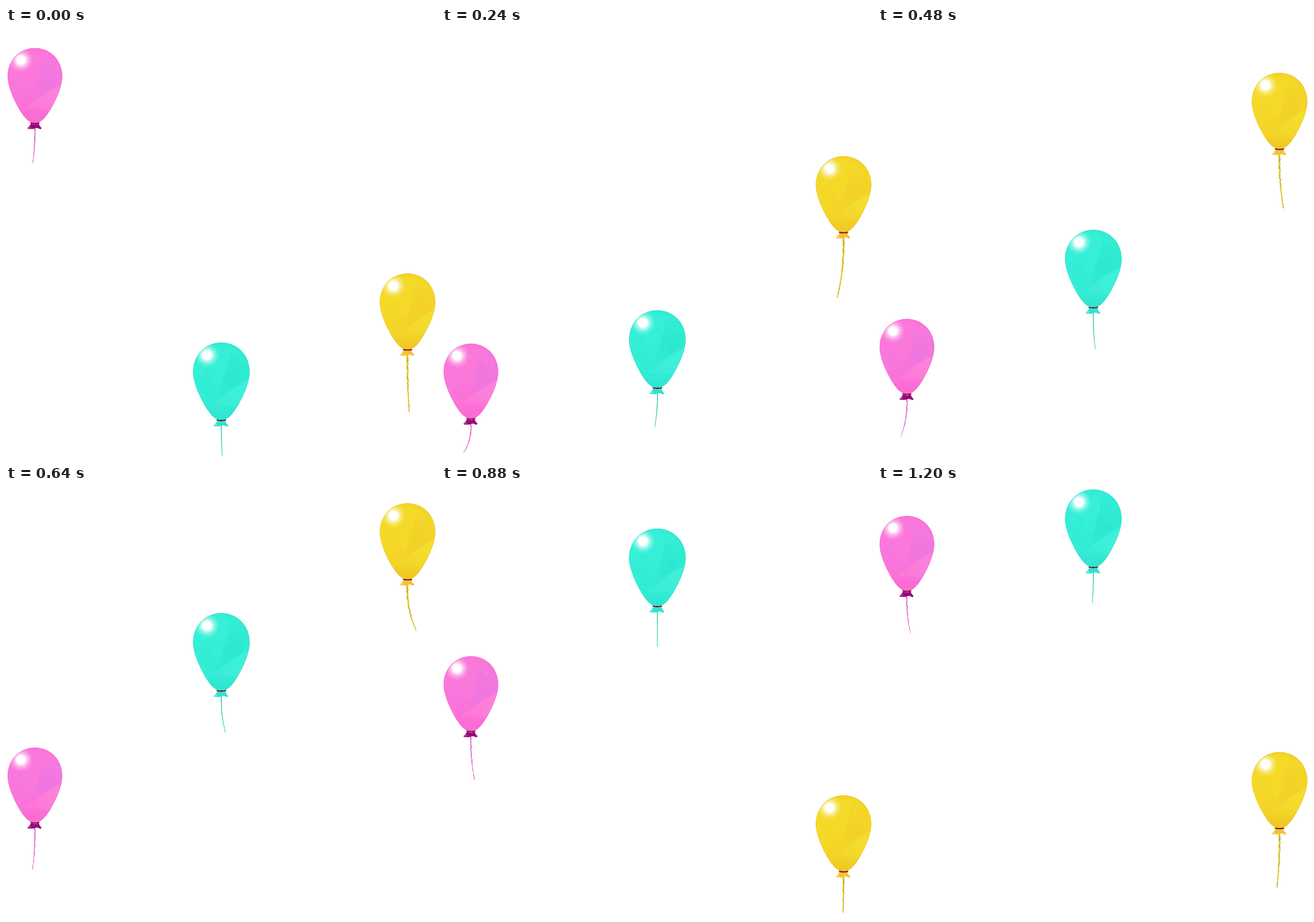
Write an HTML page with a canvas that moves like this. It is 748 px wide and 748 px high and loops after 1.28 s.

```html
<!DOCTYPE html>
<html lang="en">
<head>
<meta charset="utf-8">
<title>Balloons</title>
<style>
html, body { margin: 0; width: 100%; height: 100%; overflow: hidden; background: #fff; }
canvas { display: block; }
</style>
</head>
<body>
<canvas id="stage" width="748" height="748"></canvas>
<script>
const ctx = document.getElementById('stage').getContext('2d');
const LOOP = 1280, STEPS = 16, TAU = Math.PI * 2;

// rise: key points [steps since launch, top y]
const balloons = [
  {
    x: 50.3, scale: 0.965, seed: 11, launch: 3,
    rise: [[0, 549], [3, 506], [5, 455], [8, 296], [10, 112], [12, 52], [15, 7]],
    sway: { mid: -2, amp: 11, peak: 13, period: 18 },
    string: { length: 190, stretch: 25, width: 1.9, rough: 0.5, color: '#dc58c0', fleck: '#ee93d8' },
    base: '#fb78da', edge: '#f86ad2', facet: '#e074e4', light: '#ff86da', deep: '#ff60cf',
    knot: '#97087c', knotLight: '#c45aae', band: '#8c0c35'
  },
  {
    x: 374.6, scale: 1, seed: 23, launch: 0,
    rise: [[0, 547], [3, 491], [6, 351], [8, 221], [11, 74], [13, 25], [15, 6]],
    sway: { mid: 1.2, amp: 6, peak: 8, period: 10.5 },
    string: { length: 198, stretch: 10, width: 1.5, rough: 0.1, color: '#2cc6b0', fleck: '#2cc6b0' },
    base: '#35efd6', edge: '#2fe2cd', facet: '#22e0c8', light: '#46f1dc', deep: '#2fe4d2',
    knot: '#2de3d0', knotLight: '#8ff2e8', band: '#5e2024'
  },
  {
    x: 698.5, scale: 0.98, seed: 37, launch: 11,
    rise: [[0, 538], [2, 512], [5, 427], [8, 223], [11, 78], [13, 30], [15, 8]],
    sway: { mid: 2, amp: 13, peak: 8, period: 10.5 },
    string: { length: 204, stretch: 42, width: 3, rough: 0.9, color: '#e0c82e', fleck: '#c4ac2c' },
    base: '#f4da27', edge: '#eec128', facet: '#f0c628', light: '#f5df30', deep: '#f1c322',
    knot: '#f6c233', knotLight: '#fbdf84', band: '#7d1c1c'
  }
];

function random(seed) {
  return () => {
    seed = (seed * 16807) % 2147483647;
    return seed / 2147483647;
  };
}

// Monotone cubic through [x, y] points.
function curve(points, x) {
  const last = points.length - 1;
  let i = 0;
  while (i < last - 1 && x >= points[i + 1][0]) i++;
  const slope = k => (points[k + 1][1] - points[k][1]) / (points[k + 1][0] - points[k][0]);
  const tangent = k => {
    if (k === 0) return slope(0);
    if (k === last) return slope(last - 1);
    const a = slope(k - 1), b = slope(k);
    return a * b <= 0 ? 0 : 2 * a * b / (a + b);
  };
  const [x0, y0] = points[i], [x1, y1] = points[i + 1];
  const h = x1 - x0, u = (x - x0) / h, v = 1 - u;
  return y0 * v * v * (1 + 2 * u) + y1 * u * u * (3 - 2 * u)
    + h * u * v * (tangent(i) * v - tangent(i + 1) * u);
}

const skin = new Path2D(
  'M0 0C28 0 49.3 22 49.3 51C49.3 73 33 105 21.5 121C14 131 8 135 0 135' +
  'C-8 135-14 131-21.5 121C-33 105-49.3 73-49.3 51C-49.3 22-28 0 0 0Z');
const knot = new Path2D(
  'M-7 136Q0 139 7 136Q8 141 12 144Q11 147 9 146Q4 143 0 145Q-5 147-8 145.5Q-12 147-13.5 144.5Q-9 141-7 136Z');
const wedge = new Path2D('M16 14L38 16Q52 40 48 64Q20 76-2 100Q-8 105-16 106Q2 80 16 14Z');
const fold = new Path2D('M-25 44L-8 86L-18 108Q-40 84-46 60Z');
const sheen = new Path2D('M-18 110Q10 84 50 65Q46 88 24 112Q-2 106-18 110Z');

function fade(x, y, r, stops) {
  const g = ctx.createRadialGradient(x, y, 0, x, y, r);
  stops.forEach(([at, color]) => g.addColorStop(at, color));
  return g;
}

function fill(shape, style, alpha = 1) {
  ctx.globalAlpha = alpha;
  ctx.fillStyle = style;
  ctx.fill(shape);
  ctx.globalAlpha = 1;
}

function drawSpeckles(seed) {
  const rnd = random(seed);
  ctx.fillStyle = '#fff';
  for (let i = 0; i < 60; i++) {
    const x = -42 + 82 * rnd(), y = 15 + 55 * Math.pow(rnd(), 1.5);
    ctx.globalAlpha = 0.12 + 0.33 * rnd();
    ctx.beginPath();
    ctx.arc(x, y, 0.35 + 0.5 * rnd(), 0, TAU);
    ctx.fill();
  }
  ctx.globalAlpha = 1;
}

function drawBody(b) {
  ctx.save();
  ctx.scale(b.scale, b.scale);
  fill(knot, b.knot);
  ctx.fillStyle = b.knotLight;
  ctx.globalAlpha = 0.65;
  ctx.beginPath();
  ctx.ellipse(-9.5, 143.5, 3, 1.3, -0.6, 0, TAU);
  ctx.fill();
  ctx.globalAlpha = 1;

  ctx.save();
  ctx.clip(skin);
  fill(skin, fade(-2, 60, 82, [[0, b.base], [0.6, b.base], [1, b.edge]]));
  fill(wedge, fade(22, 64, 50, [[0, b.facet], [1, b.facet + '30']]), 0.5);
  fill(fold, b.facet, 0.15);
  fill(sheen, b.light, 0.65);
  fill(skin, fade(-6, 118, 50, [[0, b.deep + '60'], [1, b.deep + '00']]));
  drawSpeckles(b.seed);
  fill(skin, fade(-25, 22, 22, [
    [0, '#fff'], [0.32, '#fff'], [0.55, '#ffffff78'], [0.8, '#ffffff24'], [1, '#ffffff00']
  ]));
  ctx.strokeStyle = b.edge;
  ctx.lineWidth = 1.4;
  ctx.stroke(skin);
  ctx.restore();

  ctx.strokeStyle = b.band;
  ctx.lineWidth = 2.3;
  ctx.beginPath();
  ctx.moveTo(-7.2, 135);
  ctx.quadraticCurveTo(0, 137, 7.2, 135);
  ctx.stroke();
  ctx.restore();
}

function drawString(b, step, age) {
  const { length, stretch, width, rough, color, fleck } = b.string;
  const { mid, amp, peak, period } = b.sway;
  const rnd = random(b.seed + 5);
  const tip = mid + amp * Math.cos(TAU * (step - peak) / period);
  const top = 144 * b.scale;
  const drop = length + stretch * Math.sin(Math.PI * age / 15) - top;
  const n = Math.round(drop / 1.6);
  // Hangs straight at the knot and bends out towards the tip.
  const at = u => [
    tip * u * (1.32 * u - 0.32) + (rnd() - 0.5) * rough * (2 - u),
    top + drop * u
  ];
  let from = at(0);
  ctx.lineCap = 'round';
  for (let i = 1; i <= n; i++) {
    const to = at(i / n);
    ctx.strokeStyle = rnd() < 0.3 ? fleck : color;
    ctx.lineWidth = width * (1 - 0.5 * i / n);
    ctx.beginPath();
    ctx.moveTo(...from);
    ctx.lineTo(...to);
    ctx.stroke();
    from = to;
  }
}

function draw(step) {
  ctx.fillStyle = '#fff';
  ctx.fillRect(0, 0, 748, 748);
  for (const b of balloons) {
    const age = (step - b.launch + STEPS) % STEPS;
    ctx.save();
    ctx.translate(b.x, curve(b.rise, age));
    drawString(b, step, age);
    drawBody(b);
    ctx.restore();
  }
}

const start = performance.now();
let shown = -1;
function tick() {
  const t = (performance.now() - start) % LOOP;
  const step = Math.floor(t / LOOP * STEPS);
  if (step !== shown) draw(shown = step);
  requestAnimationFrame(tick);
}
tick();
</script>
</body>
</html>
```
